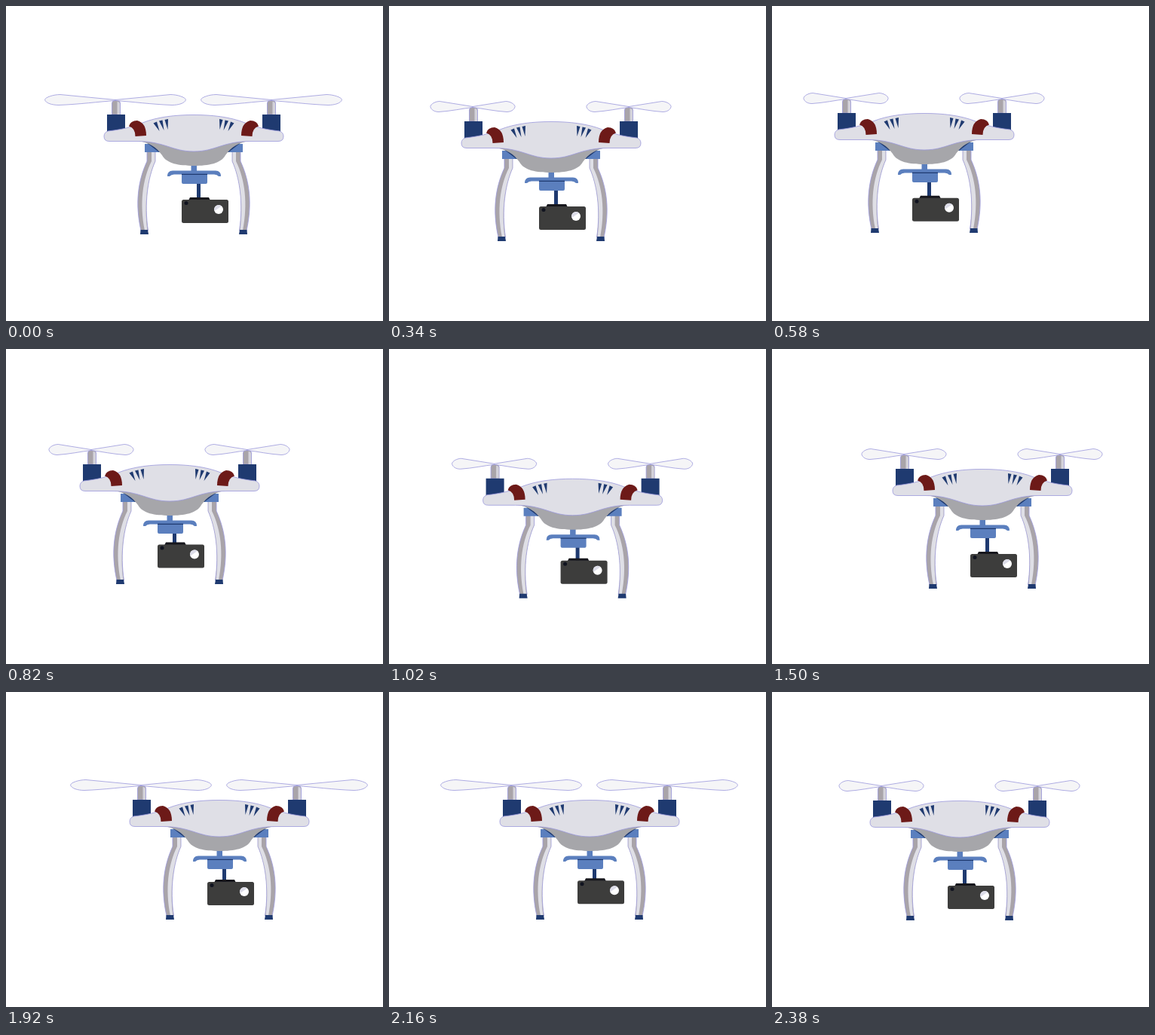
Recreate the animation shown at these times as an HTML page. Size 500 px wide and 418 px high, loop 2400 ms.

```html
<!DOCTYPE html>
<html lang="en">
<head>
<meta charset="utf-8">
<title>Hovering drone</title>
<style>
  html, body { margin: 0; width: 100%; height: 100%; overflow: hidden; background: #fff; }
  svg { display: block; width: 100vw; height: 100vh; }
  .line { stroke: #9b99dc; stroke-width: .8; }
  .navy { fill: #1f3a70; }
  .blue { fill: #5b7fbe; }
  .grey { fill: #a9a4a9; }
  .pale { fill: #dfdfe6; }
</style>
</head>
<body>
<svg viewBox="0 0 500 418">
  <defs>
    <g id="prop">
      <path id="blade" class="line" vector-effect="non-scaling-stroke" fill="#f5f5f7"
        d="M0-.5 L-73-7.500 C-82-7.500-93-4-93.500-.5 C-92 4-84 6.500-75 6.500 C-48 5.500-22 2 0 .5Z"/>
      <use href="#blade" transform="scale(-1 1)"/>
    </g>
    <!-- everything that is mirrored behind the body -->
    <g id="back">
      <path class="grey line" d="M187 193 H198 V206 C188 228 183 262 188.500 298 H179 C171 262 175 232 187 206Z"/>
      <path class="pale" d="M193 193 H197.500 V206 C187 230 183 262 187.500 298 H184 C177 262 181 230 193 206Z"/>
      <path class="navy" d="M178.500 297 H188 L189 303 H178Z"/>
      <path class="blue" d="M184 183 H206 V194 H184Z"/>
      <path class="navy" d="M186 181 L203 194 H206 V181Z"/>
      <path class="navy" d="M134 144 H158 V168 H134Z"/>
    </g>
    <g id="axle">
      <path class="grey line" d="M140.500 144 V129 Q141 125 146 125 Q151 125 151.500 129 V144Z"/>
      <path fill="#d3d2da" d="M147.500 144 V127 Q151 127 151 130 V144Z"/>
    </g>
    <g id="trim">
      <path fill="#6d1a18" d="M163 159.500 Q165 152 174 152 Q186 155 186 172 L171.500 173 Q171.500 162 163 159.500Z"/>
      <path class="navy" d="M195.500 155.500 L200 153.500 L203.500 166Z M203 152.500 L207.500 151.500 L209.500 165Z M210.500 151 L215 150 L214.500 164Z"/>
    </g>
  </defs>
  <g id="drone">
    <use href="#axle"/><use href="#axle" x="206"/>
    <use href="#back"/><use href="#back" transform="translate(498) scale(-1 1)"/>
    <path class="blue" d="M245.500 210 H253 V220 H245.500Z"/>
    <path fill="#a6a6aa" d="M175 179 C190 181 200 188 207 198 C213 209 229 212 249 212 C269 212 285 209 291 198 C298 188 308 181 323 179Z"/>
    <path class="pale line" d="M135 166 C153 164 166 161 181 155 C201 147 225 144.500 249 144.500 C273 144.500 297 147 317 155 C332 161 345 164 363 166 Q368 168 368 173 Q368 179.500 361 179.500 H325 C287 179.500 278 193 249 193 C220 193 211 179.500 173 179.500 H137 Q130 179.500 130 173 Q130 168 135 166Z"/>
    <use href="#trim"/><use href="#trim" transform="translate(498) scale(-1 1)"/>
    <g id="camera">
      <path class="navy" d="M253 230 H258 V255 H253Z"/>
      <path fill="#17171d" d="M242 258 L244 254 H269 L271 258Z"/>
      <rect x="233" y="257" width="62" height="31" rx="2.500" fill="#3d3d3c"/>
      <circle cx="239" cy="261.500" r="2.500" fill="#10131f"/>
      <circle cx="282" cy="270" r="6" fill="#fff"/>
      <path fill="#dcdce8" d="M276.500 272 A6 6 0 0 1 286 265.500Z"/>
    </g>
    <path class="blue" d="M214 226 Q214 218.500 221 218.500 H278 Q285 218.500 285 226 H282 Q280 223.500 276 223.500 H267 V234 Q267 236 265 236 H235 Q233 236 233 234 V223.500 H223 Q219 223.500 217 226Z"/>
    <path class="navy" d="M233 222.700 H267 V224 H233Z"/>
    <use href="#prop" id="left"/>
    <use href="#prop" id="right"/>
  </g>
</svg>
<script>
const LOOP = 2400, STEP = 20, FLIGHT = LOOP - STEP;
// waypoints of the closed flight: time, x, y
const route = [[0, 0, 0], [340, -34, 9], [580, -47, -2], [820, -32, 9], [1080, 3.5, 30],
  [1220, 24, 26], [1500, 30, 15], [1920, 34, -1], [2160, 17, -1]];
const [drone, camera, left, right] =
  ["drone", "camera", "left", "right"].map(id => document.getElementById(id));

// waypoint i of the endless route, with its time unwrapped
function point(i, axis) {
  const n = route.length, lap = Math.floor(i / n), p = route[i - lap * n];
  return [p[0] + lap * FLIGHT, p[axis]];
}

function secant(i, axis) {
  const [t0, a] = point(i, axis), [t1, b] = point(i + 1, axis);
  return (b - a) / (t1 - t0);
}

// harmonic mean of both sides, flat at turning points
function slope(i, axis) {
  const p = secant(i - 1, axis), q = secant(i, axis);
  return p * q > 0 ? 2 * p * q / (p + q) : 0;
}

function along(axis, t) {
  let i = route.length - 1;
  while (route[i][0] > t) i--;
  const [t0, a] = point(i, axis), [t1, b] = point(i + 1, axis);
  const d = t1 - t0, u = (t - t0) / d, w = 1 - u;
  return a * w * w * (1 + 2 * u) + b * u * u * (3 - 2 * u)
    + d * u * w * (w * slope(i, axis) - u * slope(i + 1, axis));
}

// the camera is pulled up once in each half of the loop
function lift(t) {
  const u = (t % (LOOP / 2) - 540) / 660;
  return u > 0 ? -7 * Math.sin(Math.PI * u) ** 2 : 0;
}

function move(el, x, y, scale = 1) {
  el.setAttribute("transform", `translate(${x.toFixed(2)} ${y.toFixed(2)}) scale(${scale} 1)`);
}

function draw(ms) {
  const n = Math.floor(ms % LOOP / STEP), t = n * STEP, flight = t % FLIGHT;
  const spread = .6 + .4 * Math.cos(n * Math.PI / 2);
  move(drone, along(1, flight), along(2, flight));
  move(camera, 0, lift(t));
  move(left, 145, 125, spread);
  move(right, 352, 125, spread);
}

const start = performance.now();
function tick(now) {
  draw(Math.max(0, now - start));
  requestAnimationFrame(tick);
}
draw(0);
requestAnimationFrame(tick);
</script>
</body>
</html>
```
